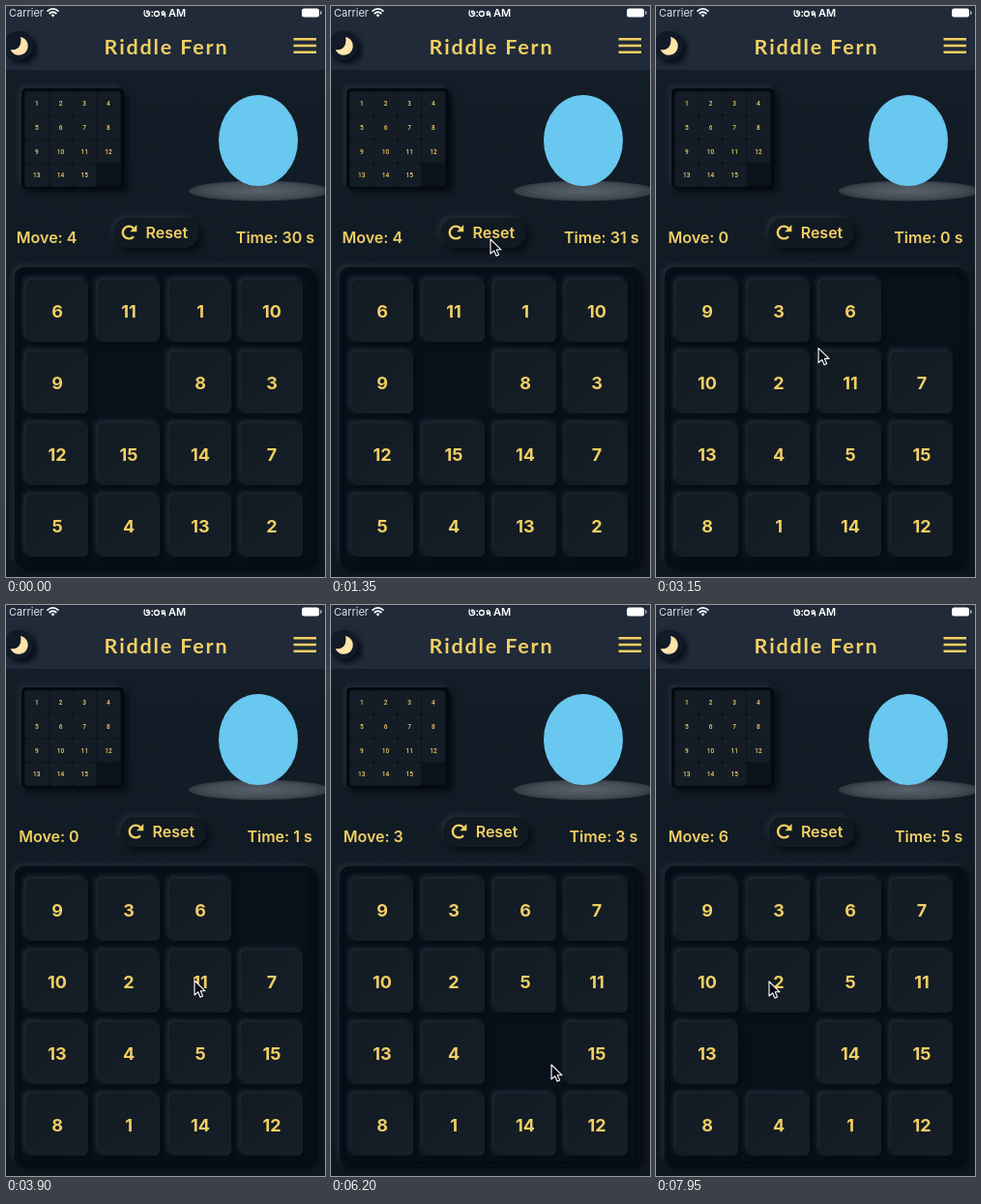
Recreate the animation shown at these times as an HTML page. Size 330 by 590 pixels, loop 8 s.

```html
<!DOCTYPE html>
<html lang="en">
<head>
<meta charset="utf-8">
<title>Sliding puzzle</title>
<style>
  html, body { margin: 0; width: 100%; height: 100%; overflow: hidden; background: #101922; }
  svg { display: block; width: 100vw; height: 100vh; }
  text { font-family: Inter, Roboto, sans-serif; fill: #f2cf63; }
  .mid { text-anchor: middle; }
  .label { font-size: 16px; font-weight: 600; }
  .num { font-size: 18px; font-weight: 700; }
  .mini { font: 500 6.5px Roboto, sans-serif; }
  .title { font: 700 21.5px Lato, sans-serif; letter-spacing: 1.85px; }
  .status { font-size: 11px; fill: #dfe2e8; }
</style>
</head>
<body>
<svg viewBox="0 0 330 590" preserveAspectRatio="none">
  <defs>
    <linearGradient id="page" x2="0" y2="1">
      <stop offset="0" stop-color="#141e28"/><stop offset="1" stop-color="#0e1720"/>
    </linearGradient>
    <linearGradient id="face" x2="1" y2="1">
      <stop offset="0" stop-color="#121a23"/><stop offset="1" stop-color="#161e27"/>
    </linearGradient>
    <radialGradient id="floor">
      <stop offset="0" stop-color="#59616a"/><stop offset=".75" stop-color="#444c55"/>
      <stop offset="1" stop-color="#313a43"/>
    </radialGradient>
    <filter id="raised" x="-20%" y="-20%" width="140%" height="140%" color-interpolation-filters="sRGB">
      <feDropShadow dx="4" dy="4" stdDeviation="3" flood-color="#050c14" result="dark"/>
      <feDropShadow in="SourceGraphic" dx="-3" dy="-3" stdDeviation="2.5" flood-color="#222b36" result="light"/>
      <feMerge>
        <feMergeNode in="light"/><feMergeNode in="dark"/><feMergeNode in="SourceGraphic"/>
      </feMerge>
    </filter>
    <filter id="soft" x="-20%" y="-20%" width="140%" height="140%"><feGaussianBlur stdDeviation="1.5"/></filter>
  </defs>

  <rect width="330" height="590" fill="url(#page)"/>
  <rect width="330" height="66" fill="#202a39"/>

  <text class="status" x="3" y="11">Carrier</text>
  <g fill="none" stroke="#fff" stroke-width="1.8">
    <path d="M42.5 5.6Q48.5 .2 54.5 5.6M44.7 8Q48.5 4.6 52.3 8"/>
    <path d="M46.6 9.4Q48.5 7.8 50.4 9.4L48.5 11.4Z" fill="#fff" stroke="none"/>
  </g>
  <g fill="none" stroke="#fff" stroke-width="1.3">
    <path d="M143.4 4.4Q142 10.6 145.5 10.6Q149 10.6 148.6 7.5Q148 4.6 145.7 5.2Q145 7.5 148.2 8.5"/>
    <circle cx="155.9" cy="8" r="2.5"/>
    <path d="M160.8 9.2Q164.6 9.6 164.2 6.8Q163 4.7 161.2 6.2Q160.6 8.5 164.5 8.4L164.6 11.4"/>
  </g>
  <path d="M150.5 5.4h1.5v1.5h-1.5zM150.5 9.4h1.5v1.5h-1.5z" fill="#fff"/>
  <text class="status" x="168" y="11" style="font-weight:600;fill:#fff">AM</text>
  <rect x="306" y="2.5" width="18" height="9" rx="2.5" fill="#fff"/>
  <rect x="325" y="5" width="1.5" height="4" rx=".7" fill="#aeb4be"/>

  <circle cx="13" cy="41" r="15" fill="#121a27" filter="url(#raised)"/>
  <path d="M15 32A9.5 9.5 0 1 1 4.6 45.3Q13 46 15 39Q16 35 15 32Z" fill="#ffe4ab"/>
  <text class="title mid" x="166" y="49.5">Riddle Fern</text>
  <path d="M297.5 34.2H321M297.5 41H321M297.5 47.8H321" stroke="#f2cf63" stroke-width="2.5"/>

  <rect x="16" y="85" width="106" height="104" rx="5" fill="#0b121b" filter="url(#raised)"/>
  <rect x="17.5" y="86.5" width="103" height="101" rx="4" fill="none" stroke="#03080f" stroke-width="2.5"/>
  <g id="mini"></g>

  <ellipse cx="262" cy="191" rx="73" ry="10.5" fill="url(#floor)"/>
  <ellipse cx="261" cy="139" rx="41" ry="47" fill="#69c8ef"/>

  <text class="label" id="move" y="245"></text>
  <g id="reset">
    <rect x="-44" y="219" width="88" height="31" rx="15" fill="#111922" filter="url(#raised)"/>
    <path d="M-23.6 238.2A6.4 6.4 0 1 1 -23.5 229.9" fill="none" stroke="#f2cf63" stroke-width="2.4"/>
    <path d="M-20.3 226V233.2H-27.5Z" fill="#f2cf63"/>
    <text class="label" x="-11" y="239.8">Reset</text>
  </g>
  <text class="label" id="time" y="245"></text>

  <rect x="9" y="270" width="311" height="310" rx="10" fill="#0b131c" filter="url(#raised)"/>
  <rect x="12" y="273" width="305" height="305" rx="8" fill="#08101a"/>
  <rect x="12" y="273" width="305" height="305" rx="8" fill="none" stroke="#040a12" stroke-width="4" filter="url(#soft)"/>
  <g id="tiles" filter="url(#raised)"></g>

  <path id="cursor" d="M0 0V15L3.6 11.8 6 17.2 8.6 16 6.2 10.8H11Z" fill="#080b10" stroke="#fff" stroke-width="1.1" stroke-linejoin="round"/>
</svg>
<script>
const LOOP = 8000, RESET = 1550, FIRST_TICK = 380;
const BEFORE = [6, 11, 1, 10, 9, 0, 8, 3, 12, 15, 14, 7, 5, 4, 13, 2];
const AFTER = [9, 3, 6, 0, 10, 2, 11, 7, 13, 4, 5, 15, 8, 1, 14, 12];
// [time, tile that slides into the gap]
const MOVES = [[4450, 7], [5350, 11], [5850, 5], [6650, 14], [7200, 1], [7700, 4]];
// [time, x, y] of the pointer tip
const PATH = [
  [900, 326, 300], [1300, 165, 241], [1650, 165, 241], [2250, 141, 319], [2600, 141, 319],
  [3700, 195, 388], [3950, 195, 388], [4350, 270, 386], [4550, 270, 386], [5000, 223, 331],
  [5250, 205, 390], [5400, 205, 390], [5750, 206, 462], [5900, 206, 464], [6200, 228, 475],
  [6550, 206, 538], [6700, 206, 538], [7100, 132, 540], [7250, 132, 540], [7600, 126, 464],
  [7720, 126, 462], [7950, 117, 389], [8000, 117, 387]
];

const $ = id => document.getElementById(id);
const add = (parent, name, attrs, label) => {
  const el = document.createElementNS('http://www.w3.org/2000/svg', name);
  for (const key in attrs) el.setAttribute(key, attrs[key]);
  if (label) el.textContent = label;
  return parent.appendChild(el);
};

const tiles = [];
for (let n = 1; n < 16; n++) {
  const x = 31.8 + (n - 1) % 4 * 24.7, y = 100.5 + Math.floor((n - 1) / 4) * 24.8;
  add($('mini'), 'rect', { x: x - 11.7, y: y - 11.7, width: 23.4, height: 23.4, rx: 2, fill: '#141c26', stroke: '#1a232d', 'stroke-width': .5 });
  add($('mini'), 'text', { class: 'mini mid', x, y: y + 2.4 }, n);

  tiles[n] = add($('tiles'), 'g', {});
  add(tiles[n], 'rect', { x: -32, y: -32, width: 64, height: 64, rx: 6, fill: 'url(#face)' });
  add(tiles[n], 'text', { class: 'num mid', y: 6.6 }, n);
}

function gridAt(moves) {
  const grid = AFTER.slice();
  for (const [, n] of moves) {
    const from = grid.indexOf(n), to = grid.indexOf(0);
    grid[to] = n;
    grid[from] = 0;
  }
  return grid;
}

// Three items with equal space around each one.
function layout() {
  const left = $('move').getComputedTextLength(), right = $('time').getComputedTextLength();
  const middle = 121, gap = (330 - left - middle - right) / 6;
  $('move').setAttribute('x', gap);
  $('reset').setAttribute('transform', `translate(${gap * 3 + left + middle / 2} 0)`);
  $('time').setAttribute('x', 330 - gap - right);
}

let shown = '';
function drawBoard(t) {
  const fresh = t >= RESET, done = MOVES.filter(m => m[0] <= t);
  const ticks = Math.floor((t - FIRST_TICK) / 1000) + 1;
  const secs = fresh ? Math.max(0, ticks - 3) : 30 + ticks;
  const key = [fresh, done.length, secs].join();
  if (key === shown) return;
  shown = key;
  (fresh ? gridAt(done) : BEFORE).forEach((n, i) => {
    if (n) tiles[n].setAttribute('transform', `translate(${53 + i % 4 * 74} ${315 + (i >> 2) * 74})`);
  });
  $('move').textContent = `Move: ${fresh ? done.length : 4}`;
  $('time').textContent = `Time: ${secs} s`;
  layout();
}

function drawCursor(t) {
  const i = PATH.findIndex(p => p[0] > t);
  $('cursor').style.display = i > 0 ? '' : 'none';
  if (i < 1) return;
  const [t0, x0, y0] = PATH[i - 1], [t1, x1, y1] = PATH[i];
  const u = (t - t0) / (t1 - t0), k = u * u * (3 - 2 * u);
  $('cursor').setAttribute('transform', `translate(${x0 + (x1 - x0) * k} ${y0 + (y1 - y0) * k})`);
}

const start = performance.now();
function frame() {
  const t = (performance.now() - start) % LOOP;
  drawBoard(t);
  drawCursor(t);
  requestAnimationFrame(frame);
}
frame();
</script>
</body>
</html>
```
